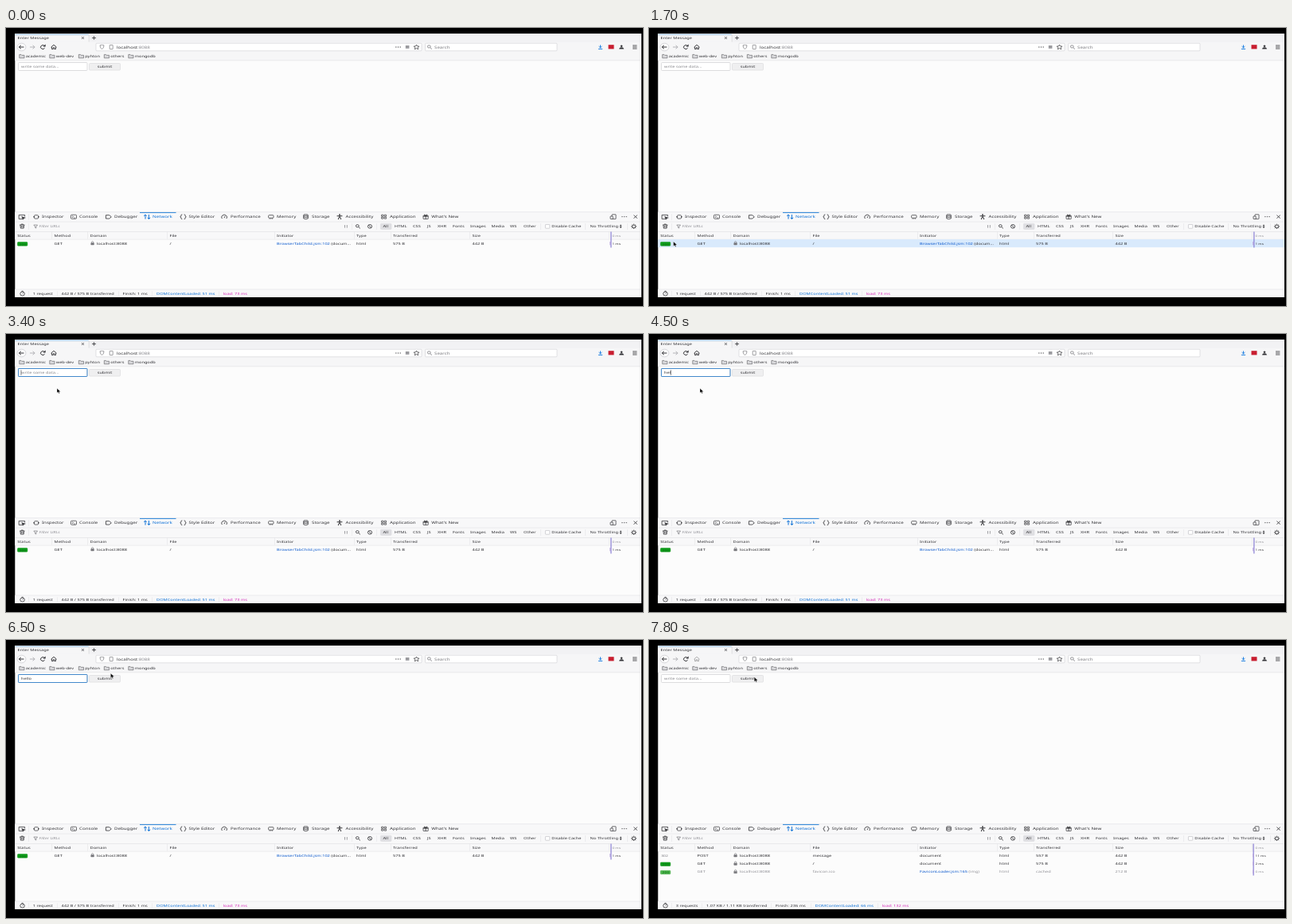
Recreate the animation shown at these times as an HTML page. Size 800 by 350 pixels, loop 8000 ms.

```html
<!DOCTYPE html>
<html lang="en">
<head>
<meta charset="utf-8">
<title>Enter Message</title>
<style>
html, body { margin: 0; width: 100%; height: 100%; overflow: hidden; background: #000; }
svg { display: block; width: 800px; height: 350px; font-family: "Noto Sans", "Open Sans", sans-serif; white-space: pre; text-rendering: geometricPrecision; }
</style>
</head>
<body>
<svg id="stage" viewBox="0 0 800 350"></svg>
<script>
const LOOP = 8000, STRETCH = 1.33;
const LEFT = 11.3, TOP = 7, WIDE = 786.7;
const INK = '#303034', GREY = '#77777c', BLUE = '#0a6fd6', LINE = '#e0e0e3', PINK = '#d42bb8';

const rect = (x, y, w, h, fill, more = '') =>
  `<rect x="${x}" y="${y}" width="${w}" height="${h}" fill="${fill}" ${more}/>`;
const band = (y, h, fill) => rect(LEFT, y, WIDE, h, fill);
const box = (x, y, w, h, fill, stroke, r = 1, line = .7) =>
  rect(x, y, w, h, fill, `rx="${r}" stroke="${stroke}" stroke-width="${line}"`);
const path = (d, color = INK, width = .8, fill = 'none') =>
  `<path d="${d}" stroke="${color}" stroke-width="${width}" fill="${fill}"/>`;
const oval = (x, y, rx, ry, color = INK, fill = 'none', width = .8) =>
  `<ellipse cx="${x}" cy="${y}" rx="${rx}" ry="${ry}" stroke="${color}" fill="${fill}" stroke-width="${width}"/>`;
// y is the middle of the line of text
const text = (x, y, s, fill = INK, size = 4.25, more = '') =>
  `<text transform="translate(${x} ${y + 1.6}) scale(${STRETCH} 1)" font-size="${size}" fill="${fill}" ${more}>${s}</text>`;
const group = (id, body) => `<g id="${id}">${body}</g>`;
const dots = (x, y) => [-2.6, 0, 2.6].map(d => oval(x + d, y, .4, .4, INK, INK, .4)).join('');
const lens = (x, y, c = INK) => oval(x - .7, y - .6, 1.9, 1.6, c) + path(`M${x + .7} ${y + .6}l2.2 2`, c);
const gear = (x, y) => oval(x, y, 2, 1.8) +
  path(`M${x - 3.6} ${y}h1.4m4.4 0h1.4M${x} ${y - 3.2}v1.2m0 4v1.2M${x - 2.6} ${y - 2.3}l1 .9m3.2 2.8l1 .9m0-4.6l-1 .9m-3.2 2.8l-1 .9`);
const lock = y => box(106.7, y - .4, 3.8, 2.5, GREY, GREY, .3, .4) +
  path(`M107.4 ${y - .4}v-1.2q1.2-1.6 2.4 0v1.2`, GREY, .7);

function browser() {
  let s = rect(LEFT, TOP, WIDE, 332, '#fcfcfc') + band(TOP, 11, '#f2f2f4') +
    rect(LEFT, TOP, 92.5, 11, '#f6f6f7') + rect(LEFT, 7.8, 92.5, .7, '#6aa6e0') + rect(103.8, 8, .6, 10, '#cfcfd3') +
    band(17.5, 23.5, '#f6f6f7') + band(40.6, .6, '#dedee1') +
    text(14.6, 12.7, 'Enter Message') + path('M95 11l3 3m0-3l-3 3', INK, .7) + path('M108 12.5h5m-2.5-2.3v4.6') +
    oval(19.5, 24, 5.4, 4.8, '#bdbdc2', '#fff', .6) + path('M22.5 24h-6m2.4-2.2l-2.6 2.2 2.6 2.2', INK, 1) +
    path('M30 24h6m-2.4-2.2l2.6 2.2-2.6 2.2', '#b4b4b8', 1) +
    path('M48.6 25.2a2.7 2.4 0 1 1-.4-2.8', INK, 1) + path('M49.5 20.8v2.5h-2.8z', INK, .3, INK) +
    group('home', path('M56.5 24.2l3.5-3 3.5 3M57.6 24v2.6h1.6v-1.8h1.6v1.8h1.6V24', INK, .9)) +
    box(113, 19.2, 409, 9.6, '#fff', '#d5d5d9') + box(526.5, 19.2, 165.5, 9.6, '#fff', '#d5d5d9') +
    path('M118 21.8q2.5-.2 2.5-.6 0 .4 2.5.6 0 3.6-2.5 4.7-2.5-1.1-2.5-4.7z', GREY, .7) +
    box(130.2, 21.4, 4, 5.2, '#fff', GREY, .4) +
    text(139, 24, 'localhost<tspan fill="#88888d">:8088</tspan>', INK, 4.65) +
    dots(492.5, 24) + rect(501.8, 22, 4.6, 3.8, '#9a9a9e') +
    path('M515.5 21l1 1.9 2.4.2-1.8 1.5.6 2.2-2.2-1.2-2.2 1.2.6-2.2-1.8-1.5 2.4-.2z', INK, .7) +
    lens(532, 24, GREY) + text(538, 24, 'Search', GREY, 4.65) +
    path('M746.5 21.4v3.4m-1.9-1.7l1.9 1.8 1.9-1.8M743.9 26.4h5.2', '#0a74e0', .9) +
    rect(756.5, 21.2, 7, 5.2, '#c81e30') +
    oval(773, 22.8, 1.1, 1, INK, INK, .5) + path('M770.2 26.2q.2-1.8 2.8-1.8t2.8 1.8z', INK, .4, INK) +
    path('M787 22h5.4m-5.4 2h5.4m-5.4 2h5.4');
  [[16.5, 'academic'], [54.5, 'web-dev'], [91, 'pyhton'], [123, 'others'], [153.5, 'mongodb']].forEach(([x, name]) => {
    s += path(`M${x + .3} 37.8v-4.4h2.2l.8 .9h3.2v3.5z`, '#6c6c70', .7, '#dadadd') + text(x + 8.2, 35.6, name);
  });
  return s;
}

function form() {
  return box(15.5, 43.5, 86.5, 10, '#fff', '#cfcfd2') +
    group('focus', box(15.5, 43.5, 86.5, 10, 'none', '#4389cc', .6, 1)) +
    text(19, 48.6, 'write some data...', '#85858a', 4.25, 'id="hint"') + text(19, 48.6, '', INK, 4.25, 'id="typed"') +
    rect(0, 45.4, .6, 6.4, INK, 'id="caret"') +
    box(104.5, 44.5, 39, 8.6, '#efeff0', '#dcdcde') + text(114.8, 48.6, 'submit');
}

function devtools() {
  let s = band(231.6, 24.6, '#f8f8f9') + band(256.2, 9.8, '#f8f8f9') + band(329, 10, '#f8f8f9');
  for (const y of [231.5, 243.7, 256, 265.8, 328.7]) s += band(y, .6, LINE);
  s += rect(168, 231.9, 45.5, 1.1, '#3a8edb') + rect(28.5, 234, .5, 8, LINE);

  [[45, 'Inspector'], [92, 'Console'], [136, 'Debugger'], [184, 'Network'], [229.5, 'Style Editor'],
   [282, 'Performance'], [340, 'Memory'], [384, 'Storage'], [426.5, 'Accessibility'],
   [482, 'Application'], [534.3, "What's New"]].forEach(([x, name]) => {
    s += text(x, 237.6, name, name == 'Network' ? BLUE : INK, 4.65);
  });
  s += path('M21 240.4h-4.8v-5h7.4v2') + path('M19.5 237.2l5 1.7-2.2.8-.8 1.6z', INK, .3, INK) +
    box(35.5, 235.6, 5, 4.4, 'none', INK) + path('M34 237.8h2m4 0h2') +
    box(81.5, 235.2, 7, 5, 'none', INK) + path('M83 236.5l1.6 1.2-1.6 1.2m2.2.2h2', INK, .6) +
    path('M125.5 235.6h4.2l2.6 2.2-2.6 2.2h-4.2z') +
    path('M175 240.5v-5.4m-1.8 1.6l1.8-1.8 1.8 1.8M179.4 234.9v5.4m-1.8-1.6l1.8 1.8 1.8-1.8', BLUE, 1) +
    path('M221.3 234.8q-1.6 0-1.4 1.4 0 1.4-1.2 1.5 1.2.1 1.2 1.5-.2 1.4 1.4 1.4M223.7 234.8q1.6 0 1.4 1.4 0 1.4 1.2 1.5-1.2.1-1.2 1.5.2 1.4-1.4 1.4') +
    path('M271.4 240a3.4 3 0 1 1 5.4 0m-2.8-.8l1.2-2.4') +
    box(329.6, 235.6, 6.4, 3.6, 'none', INK) + path('M331 239.4v1.2m1.8-1.2v1.2m1.8-1.2v1.2', INK, .7) +
    oval(376.5, 235.6, 2.8, .9) + path('M373.7 235.6v4.2q2.8 1.5 5.6 0v-4.2M373.7 237.8q2.8 1.4 5.6 0') +
    oval(419, 235, .6, .5, INK, INK) + path('M415.6 236.7h6.8M419 236.5v1.8m-1.8 2.7l1.2-2.9h1.2l1.2 2.9', INK, 1) +
    [0, 1, 2, 3].map(i => box(471.5 + i % 2 * 3.6, 235.2 + (i >> 1) * 2.9, 2.5, 2, 'none', INK, .2)).join('') +
    box(524, 237, 6.2, 3.4, 'none', INK, .3) + path('M523.4 236.8h7.4m-3.7 0v3.6m0-3.8q-2.8-.4-1.8-1.6 1.4-.2 1.8 1.6.4-1.8 1.8-1.6 1 1.2-1.8 1.6', INK, .8) +
    box(761, 234.8, 5, 5.6, 'none', INK, .4) + box(759, 237, 3.2, 3.4, '#f8f8f9', INK, .3) +
    dots(776.5, 237.6) + path('M788.4 235.6l4.4 4m0-4l-4.4 4');

  s += path('M17 248h6.6m-5.6.2l.4 3.9h3.8l.4-3.9m-3.5-.3v-.9h2.4v.9m-1.8 1.3v1.9m1.4-1.9v1.9') +
    rect(28.5, 246, .5, 8, LINE) + path('M34.8 248h4.8l-1.8 2v2l-1.2-.6V250z', GREY, .7) +
    text(41.5, 249.8, 'Filter URLs', '#929298', 4.25, 'font-style="italic"') +
    path('M425.5 248v3.6m2.8-3.6v3.6', GREY, .7) + lens(442, 249.8) +
    oval(457, 249.8, 2.6, 2.3) + path('M455.2 248.2l3.6 3.2') +
    rect(434, 246, .5, 8, LINE) + rect(465.5, 246, .5, 8, LINE) + box(470.4, 246.2, 13.6, 7.2, '#dfdfe2', '#dfdfe2') +
    rect(671, 246, .5, 8, LINE) + box(677.4, 247.4, 5.4, 4.8, '#fff', '#c2c2c6', .5) +
    text(685.3, 249.8, 'Disable Cache') + rect(727.5, 246, .5, 8, LINE) +
    text(733.5, 249.8, 'No Throttling') + path('M770.8 249.3l1.2-1.7 1.2 1.7zm0 1l1.2 1.7 1.2-1.7z', INK, .2, INK) +
    rect(780, 246, .5, 8, LINE) + gear(788.5, 249.8);
  [[473.5, 'All'], [488, 'HTML'], [511, 'CSS'], [529, 'JS'], [542, 'XHR'], [561, 'Fonts'],
   [583, 'Images'], [609.5, 'Media'], [633, 'WS'], [650, 'Other']].forEach(([x, name]) => s += text(x, 249.8, name));

  [[14.2, 'Status'], [60.5, 'Method'], [105.5, 'Domain'], [205.5, 'File'], [340, 'Initiator'],
   [440, 'Type'], [486, 'Transferred'], [585.5, 'Size']].forEach(([x, name]) => {
    s += text(x, 261.4, name) + (x > 20 ? rect(x - 3, 256.5, .5, 9, LINE) : '');
  });
  return s + rect(757, 256.5, .5, 9, LINE) +
    oval(20.6, 334.6, 2.8, 2.5) + path('M19.5 331.3h2.2M20.6 334.6l1.2-1') + rect(28.5, 331, .5, 6, LINE);
}

const link = (name, rest) => `<tspan fill="#0a58cc">${name}</tspan> ${rest}`;

function row(y, code, method, file, cause, sent, size, time, ink = INK) {
  const dim = ink != INK, ok = code == 200;
  return (ok ? box(14.5, y - 1.4, 12.4, 4.6, dim ? '#4cb54c' : '#0f9f1b', dim ? '#43a843' : '#0c8f16', .8, .5) : '') +
    text(ok ? 16.6 : 15.2, y + (ok ? .9 : .2), code, ok ? '#0a6a12' : GREY, 3.8) +
    text(60.5, y, method, ink) + lock(y) + text(113.7, y, 'localhost:8088', ink) +
    text(205.5, y, file, ink) + text(340, y, cause, ink) + text(440, y, 'html', ink) +
    text(486, y, sent, ink) + text(585.5, y, size, ink) +
    rect(758.2, y - 2, 1.2, 4.4, '#b7a5dc') + text(761.5, y, time, ink, 3.5);
}

function footer(items) {
  return items.map(([x, s], i) => text(x, 334.3, s, [INK, INK, INK, BLUE, PINK][i]) +
    (i ? rect(x - 5.5, 331.4, .5, 5.6, LINE) : '')).join('');
}

const marks = (x, h) => rect(x, 256.5, 1, h, '#7468cc') + text(761.5, 261.4, '0 ms', '#909096', 3.5);

const before = rect(LEFT, 266, WIDE, 10.2, '#d9eafc', 'id="hover"') + marks(759.4, 20) +
  row(271, 200, 'GET', '/', link('BrowserTabChild.jsm:102', '(docum…'), '575 B', '442 B', '1 ms') +
  footer([[33.8, '1 request'], [69.5, '442 B / 575 B transferred'], [146.5, 'Finish: 1 ms'],
    [189, 'DOMContentLoaded: 51 ms'], [272.5, 'load: 73 ms']]);

const post = row(271, 302, 'POST', 'message', 'document', '557 B', '442 B', '11 ms');
const waiting = post + footer([[33.8, '1 request'], [69.5, '442 B / 557 B transferred'], [146.5, 'Finish: 11 ms']]);
const after = marks(758.6, 40) + post +
  row(281.3, 200, 'GET', '/', 'document', '575 B', '442 B', '2 ms');
const icon = row(291.6, 200, 'GET', 'favicon.ico', link('FaviconLoader.jsm:165', '(img)'), 'cached', '212 B', '0 ms', '#929298');
const totals = footer([[33.8, '3 requests'], [72, '1.07 KB / 1.11 KB transferred'], [159, 'Finish: 236 ms'],
  [208.5, 'DOMContentLoaded: 66 ms'], [292.5, 'load: 132 ms']]);

const stage = document.getElementById('stage');
stage.innerHTML = browser() + form() + devtools() + group('before', before) + group('waiting', waiting) +
  group('after', after) + group('icon', icon + totals) +
  group('arrow', path('M0 0v5.6l1.4-1.1 1 1.9 1-.4-.9-1.8 1.9-.2z', '#fff', .35, '#000')) +
  group('beam', path('M-1.4-3.4q1.4 0 1.4.8v5.2q0 .8-1.4.8M1.4-3.4q-1.4 0-1.4.8M0 2.6q0 .8 1.4.8', '#222', .7));

// time, x, y of the pointer
const PATH = [[1100, 62, 303], [1400, 41, 285], [1600, 31, 270], [1700, 30.7, 269], [1800, 32.5, 247],
  [1900, 37, 211], [2200, 45, 128.7], [2300, 49, 104], [2600, 66, 47], [2800, 66, 47], [2900, 67, 47],
  [3200, 67, 47], [3400, 64, 68.5], [6100, 64, 68.5], [6500, 131.4, 42], [6700, 131.4, 42], [6800, 132.2, 46.8], [LOOP, 132.2, 46.8]];
const KEYS = [4000, 4400, 4500, 4800, 5100];

function pointer(t) {
  const i = Math.max(1, PATH.findIndex(p => p[0] > t));
  const [a, x, y] = PATH[i - 1], [b, x2, y2] = PATH[i];
  const k = (t - a) / (b - a);
  return [x + (x2 - x) * k, y + (y2 - y) * k];
}

const get = id => document.getElementById(id);
const show = (id, on) => get(id).style.display = on ? '' : 'none';

function draw(now) {
  const t = Math.floor(now % LOOP / 100) * 100;
  const [x, y] = pointer(t), seen = t >= 1100;
  const inField = t >= 2600 && t < 3300;
  const count = t < 7500 ? KEYS.filter(k => t >= k).length : 0;
  const focused = t >= 3200 && t < 7500;

  for (const id of ['arrow', 'beam']) get(id).setAttribute('transform', `translate(${x} ${y})`);
  show('arrow', seen && !inField);
  show('beam', inField);
  show('hover', seen && y > 266 && y < 276);

  get('typed').textContent = 'hello'.slice(0, count);
  show('hint', !count);
  show('focus', focused);
  show('caret', focused && !(t >= 5600 && t < 6100) && !(t >= 6500 && t < 6700));
  get('caret').setAttribute('x', [18.7, 22.6, 25.8, 27.3, 28.8, 32.2][count]);

  show('before', t < 7100);
  show('waiting', t >= 7100 && t < 7500);
  show('after', t >= 7500);
  show('icon', t >= 7600);
  get('home').style.opacity = t >= 7500 ? .4 : 1;
}

const start = performance.now();
(function tick() {
  draw(performance.now() - start);
  requestAnimationFrame(tick);
})();
</script>
</body>
</html>
```
